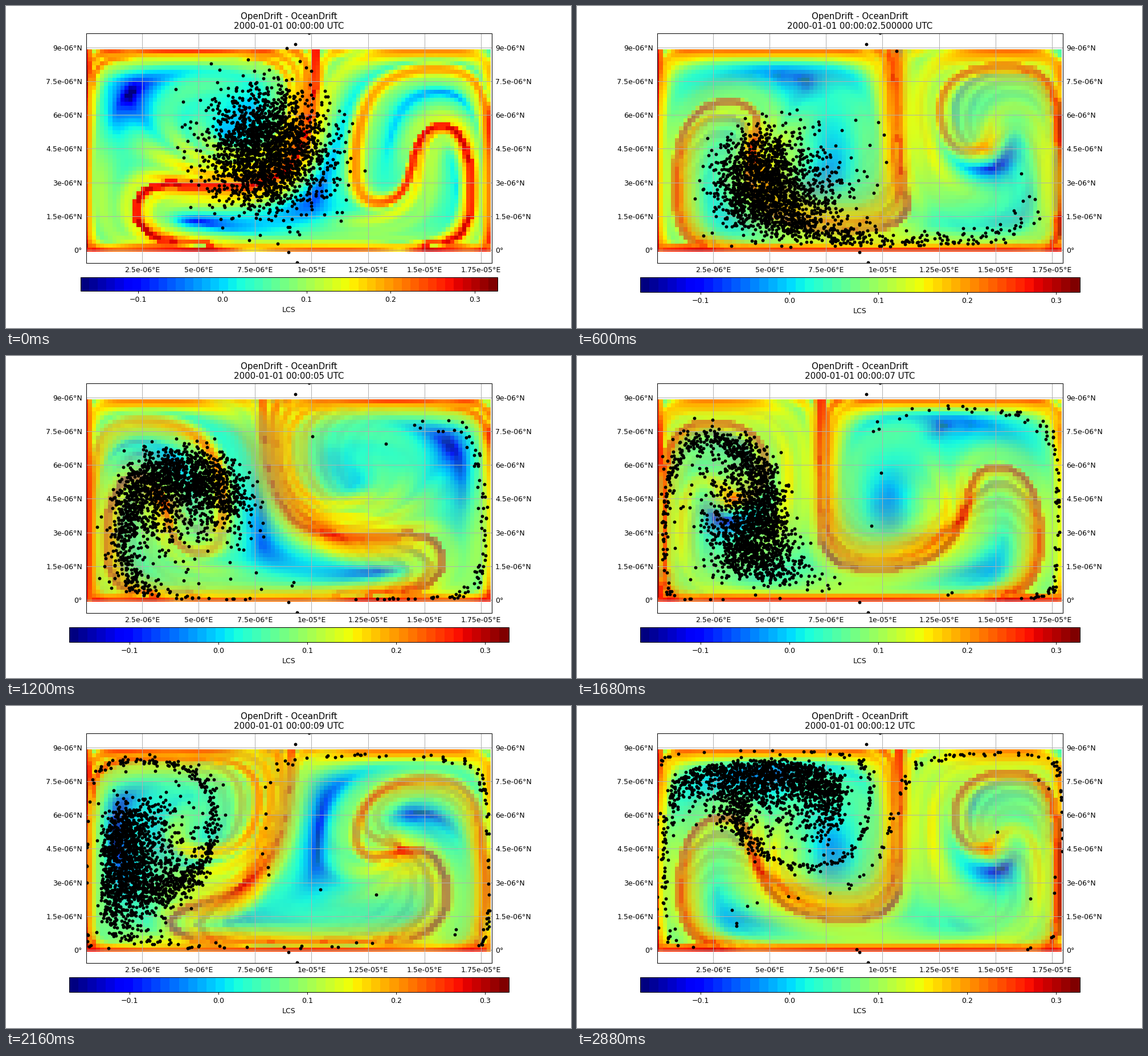
Animation of 992x565 px, one loop 3000 ms. Source, as a matplotlib script:

```python
import numpy as np
import matplotlib.pyplot as plt
from matplotlib.animation import FuncAnimation
from matplotlib.cm import ScalarMappable
from matplotlib.colors import Normalize

W, H, DPI = 992, 565, 100
PX = 72 / DPI                 # points per pixel
STEPS, DT = 25, 0.5           # output steps, seconds of model time each
SPAN = 12.0                   # integration time of the exponent, seconds
DELTA = 0.02                  # grid spacing, metres
DEG = 0.111195                # metres per micro-degree on the sphere
SX, SY = 0.99888, 1.0056      # ellipsoid to sphere scale
AMP, EPS, OMEGA = 0.1, 0.25, 0.628
VMIN, VMAX = -0.1685, 0.3265

plt.rcParams.update({
    'font.family': 'DejaVu Sans',
    'font.size': 9,
    'axes.linewidth': 1 * PX,
    'axes.titlesize': 10.8,
    'axes.titlepad': 5.4,
    'axes.labelpad': 3.6,
    'xtick.major.size': 3.15,
    'xtick.major.pad': 3.15,
    'xtick.major.width': 1 * PX,
})


def velocity(x, y, t):
    """Double gyre current, zero outside the basin."""
    a = EPS * np.sin(OMEGA * t)
    b = 1 - 2 * a
    f = np.pi * (a * x**2 + b * x)
    inside = (x >= 0) & (x <= 2) & (y >= 0) & (y <= 1)
    u = -np.pi * AMP * np.sin(f) * np.cos(np.pi * y)
    v = np.pi * AMP * np.cos(f) * np.sin(np.pi * y) * (2 * a * x + b)
    return SX * u * inside, SY * v * inside


def rk4(x, y, t, h):
    u1, v1 = velocity(x, y, t)
    u2, v2 = velocity(x + u1 * h / 2, y + v1 * h / 2, t + h / 2)
    u3, v3 = velocity(x + u2 * h / 2, y + v2 * h / 2, t + h / 2)
    u4, v4 = velocity(x + u3 * h, y + v3 * h, t + h)
    return (x + h * (u1 + 2 * u2 + 2 * u3 + u4) / 6,
            y + h * (v1 + 2 * v2 + 2 * v3 + v4) / 6)


def lyapunov():
    """Backward exponents for all steps, shape (step, y, x)."""
    gx, gy = np.meshgrid(np.arange(100) * DELTA, np.arange(50) * DELTA)
    t = (np.arange(STEPS) * DT + SPAN)[:, None, None]
    x = np.broadcast_to(gx, (STEPS,) + gx.shape)
    y = np.broadcast_to(gy, x.shape)
    for _ in range(int(SPAN / DT)):
        x, y = rk4(x, y, t, -DT)
        t = t - DT
    xa, xb = np.gradient(x - gx, axis=(1, 2))
    ya, yb = np.gradient(y - gy, axis=(1, 2))
    scale = (2 * DELTA)**2
    trace = (xa**2 + xb**2 + ya**2 + yb**2) / scale
    det = (xa * yb - xb * ya) / scale
    root = np.sqrt(np.maximum(trace**2 - 4 * det**2, 0))
    return np.log(np.maximum((trace + root) / 2, 1e-9)) / (2 * SPAN)


def blended_layers():
    """Each step is laid half transparent over the ones before."""
    colours = plt.get_cmap('jet')(Normalize(VMIN, VMAX)(lyapunov()))[..., :3]
    layers = [colours[0]]
    for c in colours[1:]:
        layers.append((layers[-1] + c) / 2)
    return layers


def particle_tracks(n=2000, radius=0.15):
    rng = np.random.RandomState(0)
    x = 0.9 + SX * radius * rng.randn(n)
    y = 0.5 + SY * radius * rng.randn(n)
    tracks = [(x, y)]
    for i in range(STEPS - 1):
        x, y = rk4(x, y, i * DT, DT)
        tracks.append((x, y))
    return tracks


def rect(left, top, right, bottom):
    """Pixel box to figure fractions."""
    return [left / W, 1 - bottom / H, (right - left) / W, (bottom - top) / H]


def degrees(value, letter):
    return f'{value * 1e-6:g}°{letter}' if value else '0°'


def clock(i):
    text = f'2000-01-01 00:00:{int(i * DT):02d}'
    return text + ('.500000' if i % 2 else '') + ' UTC'


layers = blended_layers()
tracks = particle_tracks()

fig = plt.figure(figsize=(W / 100, H / 100), dpi=DPI, facecolor='white')
ax = fig.add_axes(rect(140.5, 47.5, 852.5, 450.5))
lo, right, top = -DELTA / 2 / DEG, 1.99 / DEG, 0.99 / DEG
image = ax.imshow(layers[0], origin='lower', extent=(lo, right, lo, top),
                  aspect='auto', interpolation='nearest', zorder=0)
dots, = ax.plot([], [], 'o', color='black', ms=5.8 * PX, mew=0, zorder=5)
ax.set_xlim(0.02, 17.97)
ax.set_ylim(-0.577, 9.653)

lons = np.arange(1, 8) * 2.5
lats = np.arange(7) * 1.5
ax.set_xticks(lons, [degrees(v, 'E') for v in lons])
ax.set_yticks(lats, [degrees(v, 'N') for v in lats])
ax.tick_params(length=0, pad=6.5 * PX, labelright=True)
ax.set_axisbelow('line')
ax.grid(color='#b0b0b0', lw=1 * PX)

NARROW = rect(130.5, 475.5, 862.5, 500)
WIDE = rect(110.5, 475.5, 882.5, 502)
cax = fig.add_axes(NARROW)
bar = fig.colorbar(ScalarMappable(Normalize(VMIN, VMAX), plt.get_cmap('jet', 48)),
                   cax=cax, orientation='horizontal', label='LCS')
bar.set_ticks([-0.1, 0, 0.1, 0.2, 0.3])
bar.minorticks_off()


def update(i):
    x, y = tracks[i]
    image.set_data(layers[i])
    dots.set_data(x / DEG, y / DEG)
    ax.set_title('OpenDrift - OceanDrift\n' + clock(i))
    # the bar widens once after the first step
    cax.set_position(WIDE if i else NARROW)
    return image, dots


anim = FuncAnimation(fig, update, frames=STEPS, interval=120,
                     repeat=True, repeat_delay=0, blit=False)
plt.show()
```
